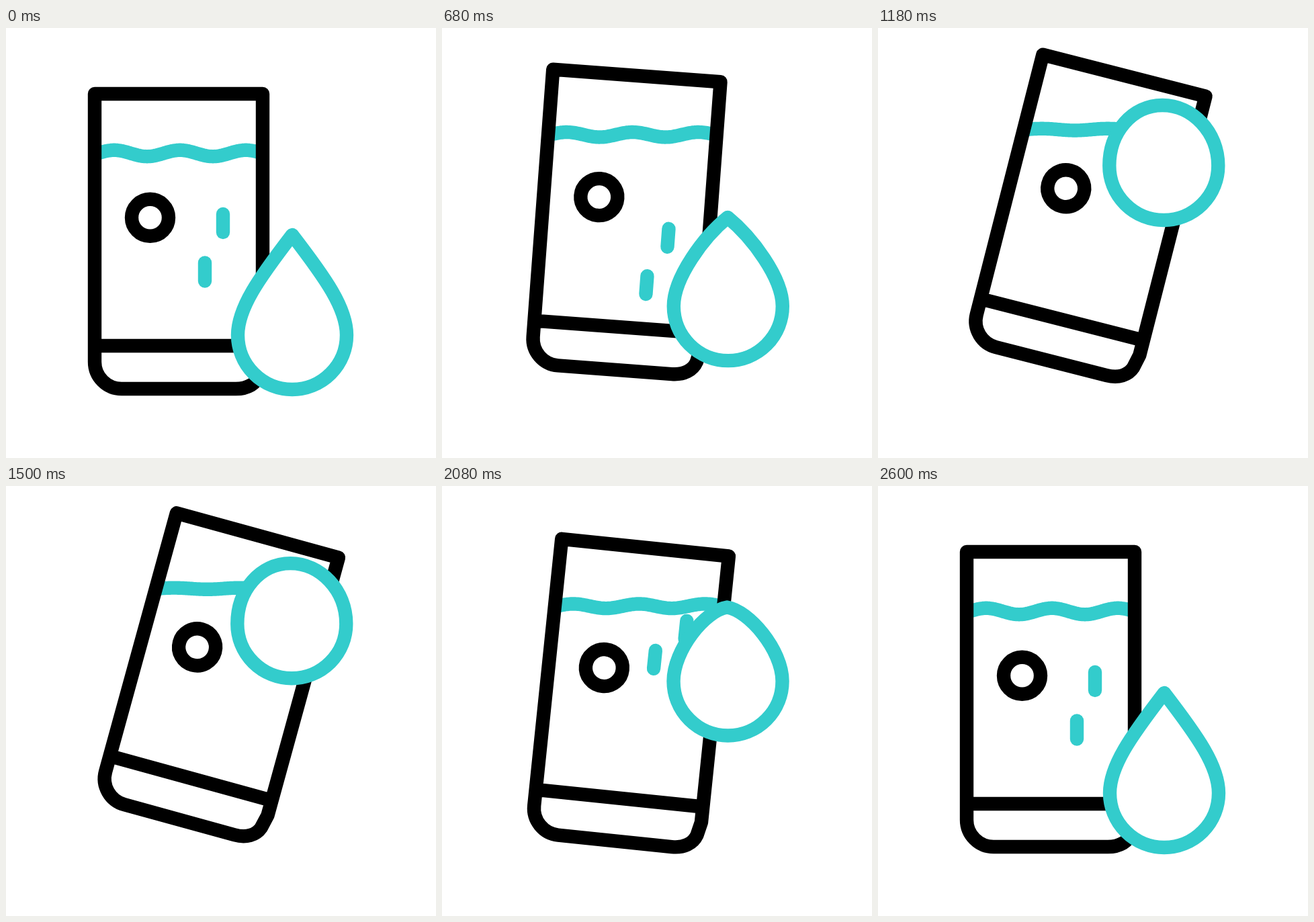
Animation, 640 px wide and 640 px high, one loop 3000 ms. Source, as an HTML page with a canvas:

```html
<!DOCTYPE html>
<html lang="en">
<head>
<meta charset="utf-8">
<title>Phone and water drop</title>
<style>
  html, body { margin: 0; width: 100%; height: 100%; overflow: hidden; background: #fff; }
  canvas { display: block; width: 640px; height: 640px; }
</style>
</head>
<body>
<canvas id="stage" width="640" height="640"></canvas>
<script>
const ctx = document.getElementById('stage').getContext('2d');
const LOOP = 3000, STEP = 20;
const START = 300, PEAK = 1390, END = 2580;
const TEAL = '#33cccc', BLACK = '#000';
const PIVOT = { x: 257, y: 541 };

// Sine ease from 0 to 1; a bend below 1 hurries the start, above 1 delays it.
function ease(t, from, to, bend = 1) {
  const u = Math.min(1, Math.max(0, (t - from) / (to - from)));
  return Math.sin(u ** bend * Math.PI / 2) ** 2;
}

function phonePose(t) {
  return {
    angle: 15.7 * (ease(t, START, PEAK) - ease(t, PEAK, END)),
    lift: -42 * (ease(t, 320, PEAK, 0.45) - ease(t, PEAK, 2400, 0.94))
  };
}

// The drop dips first, shoots up, then falls slowly back.
function dropPose(t) {
  const dip = ease(t, 340, 600);
  const rise = ease(t, 600, 1000, 0.75);
  const fall = ease(t, PEAK, END, 1.7);
  return {
    y: 457 + 11 * dip - 263 * rise + 252 * fall,
    tip: 149 - 6 * dip - 53 * rise + 59 * fall
  };
}

function stroke(color) {
  ctx.strokeStyle = color;
  ctx.stroke();
}

function clipTo(x, y, w, h) {
  ctx.beginPath();
  ctx.rect(x, y, w, h);
  ctx.clip();
}

function usePhoneSpace({ angle, lift }) {
  ctx.translate(PIVOT.x, PIVOT.y + lift);
  ctx.rotate(angle * Math.PI / 180);
  ctx.translate(-PIVOT.x, -PIVOT.y);
}

// The water slides and calms down as the phone tilts.
function drawWave({ angle, lift }) {
  const y = 186.5 + lift + 0.028 * angle ** 2;
  const amp = 4.7 - 0.235 * angle;
  const crest = 259 + 5.8 * angle;
  ctx.beginPath();
  for (let x = 100; x <= 560; x += 2) {
    ctx.lineTo(x, y - amp * Math.cos((x - crest) * 2 * Math.PI / 98));
  }
  stroke(TEAL);
}

function drawDash(x, y, shift, slant) {
  const cx = x + shift * slant, cy = y + shift;
  ctx.beginPath();
  ctx.moveTo(cx, cy - 13.5);
  ctx.lineTo(cx, cy + 13.5);
  stroke(TEAL);
}

// Dashes run out at the bottom and come back in from the top.
function drawDashes(t) {
  if (t < PEAK) {
    const shift = 104 * (Math.max(0, t - 320) / 580) ** 1.77;
    drawDash(323, 290.5, shift, -0.036);
    drawDash(296, 363, shift, -0.03);
  } else {
    const left = 1 - ease(t, 1500, 2600);
    drawDash(323, 290.5, -168 * left, -0.087);
    drawDash(296, 363, -220 * left, 0.08);
  }
}

function drawPhone() {
  ctx.beginPath();
  ctx.moveTo(132, 98);
  ctx.lineTo(132, 497);
  ctx.arc(172, 497, 40, Math.PI, Math.PI / 2, true);
  ctx.lineTo(342, 537);
  ctx.bezierCurveTo(360, 537, 373, 529, 377.5, 516);
  ctx.lineTo(382, 496);
  ctx.lineTo(382, 98);
  ctx.closePath();
  ctx.moveTo(132, 473);
  ctx.lineTo(382, 473);
  stroke(BLACK);
  ctx.beginPath();
  ctx.arc(214.5, 282.3, 27.5, 0, 2 * Math.PI);
  stroke(BLACK);
}

// The lower half stays a half circle while the tip sinks into a dome.
function drawDrop({ y, tip }) {
  const point = Math.max(0, (tip - 90) / 59);
  const x = 425.3 + 0.7 * point, r = 81;
  const tipX = x - 2 * (1 - point), top = y - tip;
  const reach = 45 + 5 * point - 64 * point * (1 - point);
  const drop = 65 * point ** 2.4;
  const side = 50 - 10 * point;
  ctx.beginPath();
  ctx.moveTo(tipX, top);
  ctx.bezierCurveTo(tipX + reach, top + drop, x + r, y - side, x + r, y);
  ctx.arc(x, y, r, 0, Math.PI);
  ctx.bezierCurveTo(x - r, y - side, tipX - reach, top + drop, tipX, top);
  ctx.closePath();
  ctx.fillStyle = '#fff';
  ctx.fill();
  stroke(TEAL);
}

function draw(t) {
  const pose = phonePose(t);
  ctx.fillStyle = '#fff';
  ctx.fillRect(0, 0, 640, 640);
  ctx.lineWidth = 20.4;
  ctx.lineCap = ctx.lineJoin = 'round';

  // Water stays level in the room but is cut by the tilted screen.
  ctx.save();
  usePhoneSpace(pose);
  clipTo(134, 98, 246, 370);
  ctx.setTransform(1, 0, 0, 1, 0, 0);
  drawWave(pose);
  ctx.restore();

  ctx.save();
  usePhoneSpace(pose);
  ctx.save();
  clipTo(134, 190, 246, 278);
  drawDashes(t);
  ctx.restore();
  drawPhone();
  ctx.restore();

  drawDrop(dropPose(t));
}

const start = performance.now();
function tick() {
  const t = (performance.now() - start) % LOOP;
  draw(Math.floor(t / STEP) * STEP);
  requestAnimationFrame(tick);
}
tick();
</script>
</body>
</html>
```
